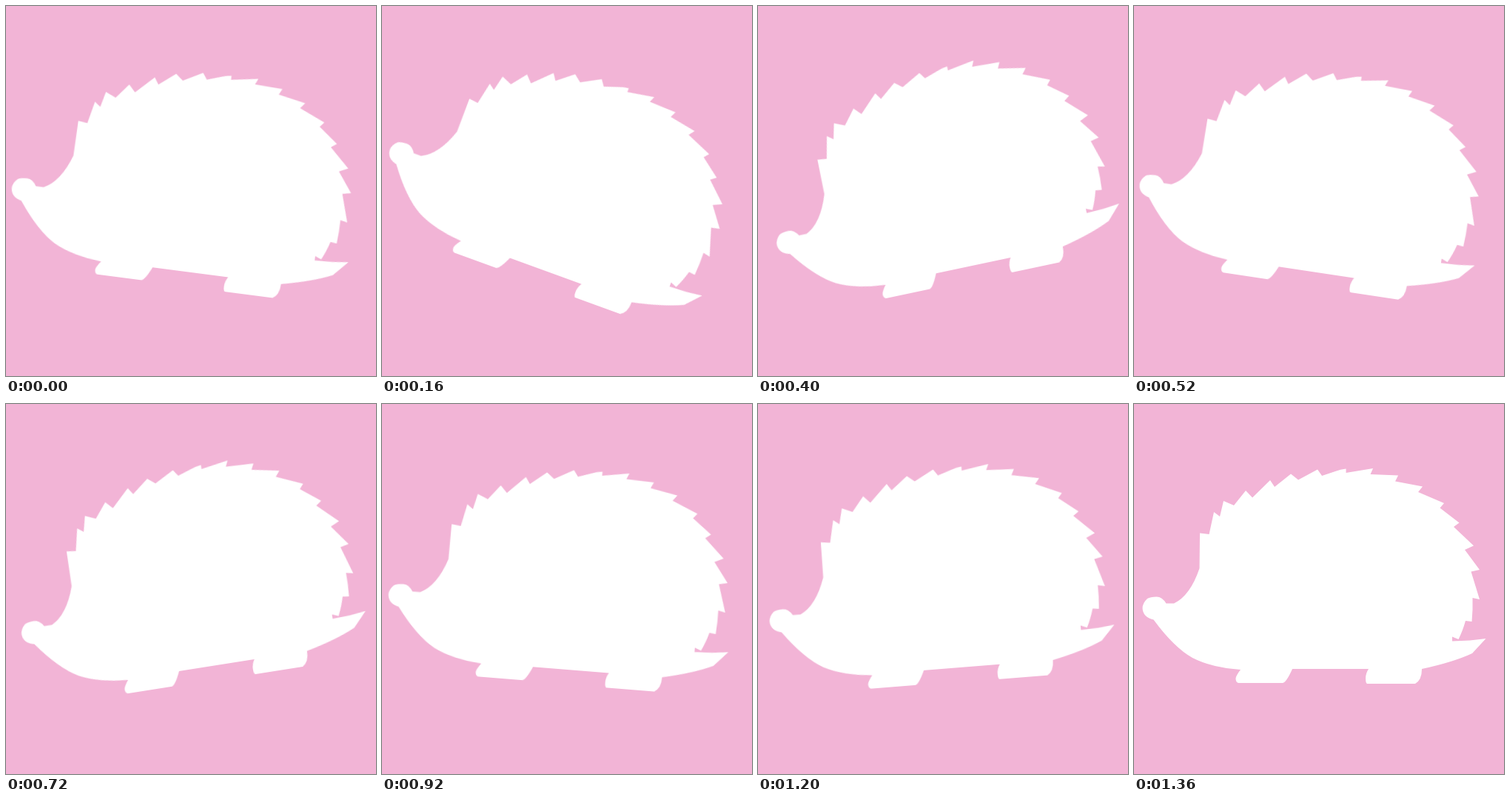
Recreate the animation shown at these times as an HTML page. Size 500 by 500 pixels, loop 2080 ms.

```html
<!DOCTYPE html>
<html lang="en">
<head>
<meta charset="utf-8">
<title>Wobbling hedgehog</title>
<style>
  html, body { margin: 0; width: 100%; height: 100%; overflow: hidden; background: #f2b4d6; }
  svg { display: block; width: 100%; height: 100%; }
  #hog { fill: #fff; transform-origin: 243px 232.5px; }
</style>
</head>
<body>
<svg viewBox="0 0 500 500">
  <path id="hog" d="
    M214 358 H317 Q313 364 313 371 Q313 377 315 378 H380 Q389 373 389 358
    Q431 349 457 337 L475.5 317 Q455 320 430 320.5
    V314.5 L438.5 318 Q444 307 448 293 L456.5 294 Q458 277 457.5 262
    L467 264 L455.5 226.500 L467 224 L447 197 L459 191.500 L432 166 L439.500 160.500
    L413.500 140.500 L419 134 L384 119 L390 111.500 L353 104.500 L357 96.500 L319.500 95
    L323 87 L286.500 93 V87.500 Q279 88 272 91 L254 97 L248 88.500 L222 102.500 L212 94.500
    L190 112 L184 103 L160 126.500 L151 117 L135 137 L121 131 L116 152 L108 146
    L101.500 176 L89 174.500 L88.500 222 Q76 259 54 269.500 H43.500
    Q38 260.500 30.500 260.500 Q22 260.500 18 263 Q11.500 269 11.500 276 Q12 288 26.500 291.500
    Q54 329 79 343 Q104 356 144 359
    Q137 368 137.500 372 Q138 377 142 377 H201 Q206 376 214 358 Z"/>
</svg>
<script>
  const LOOP = 2080, STEP = 40;

  // [time in ms, angle in degrees]; the swing is already under way at time 0
  const poses = [
    [-114, 0], [160, 20], [356, -15], [550, 10],
    [749, -10], [940, 5], [1240, -5], [1360, 0]
  ];

  const ease = p => (1 - Math.cos(Math.PI * p)) / 2;

  function angleAt(t) {
    const i = poses.findIndex(([end]) => t < end);
    if (i < 0) return 0;
    const [t0, a0] = poses[i - 1], [t1, a1] = poses[i];
    return a0 + (a1 - a0) * ease((t - t0) / (t1 - t0));
  }

  // Hold each pose for one step, 25 per second
  const frames = [];
  for (let t = 0; t <= LOOP; t += STEP) {
    frames.push({
      offset: t === LOOP ? 1 : Math.max(0, t - 0.5) / LOOP,
      transform: `rotate(${angleAt(t).toFixed(3)}deg)`,
      easing: 'step-end'
    });
  }

  document.getElementById('hog').animate(frames, { duration: LOOP, iterations: Infinity });
</script>
</body>
</html>
```
